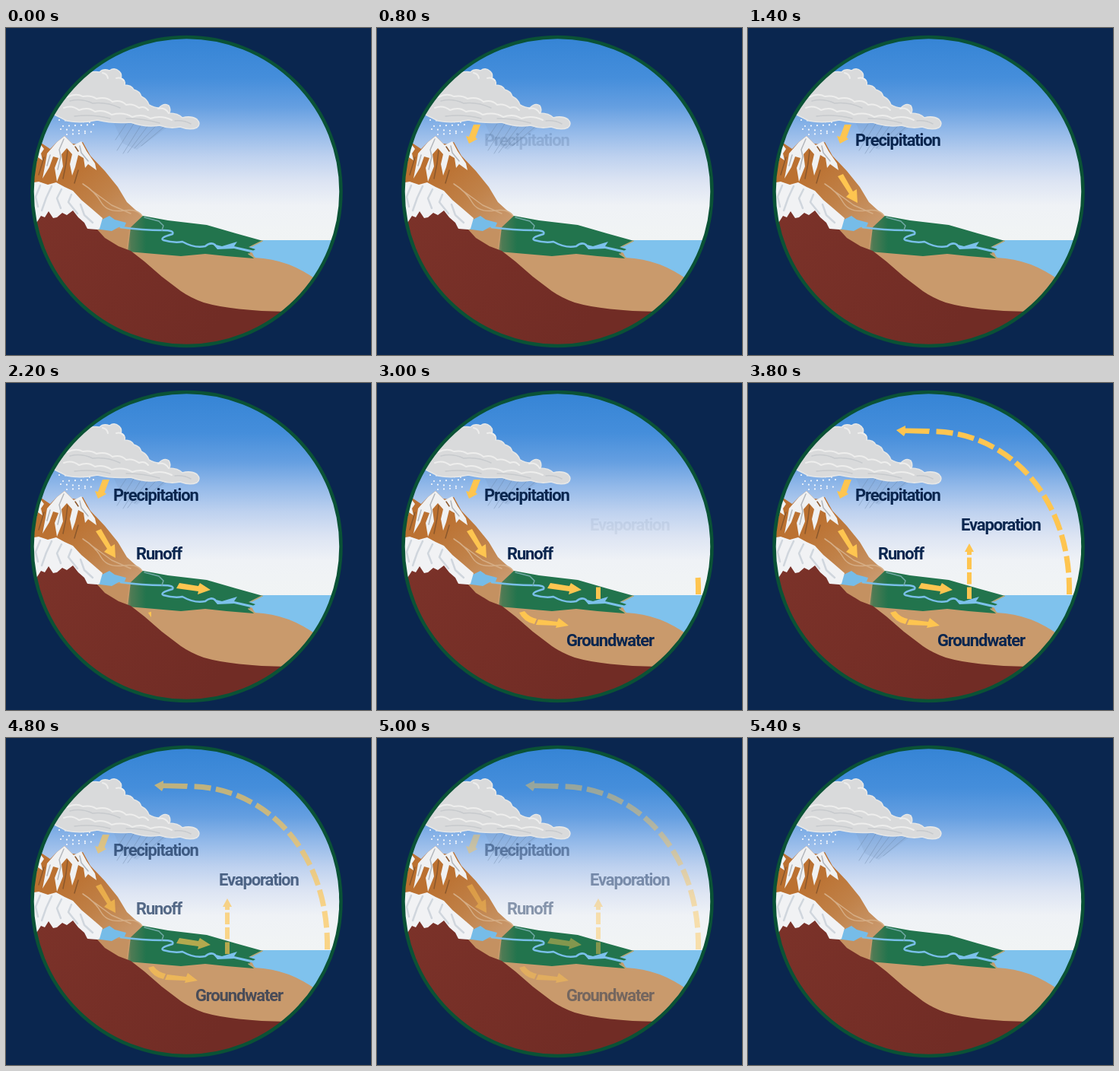
Write an HTML page that moves like this. It is 480 px wide and 430 px high and loops after 5.6 s.

```html
<!DOCTYPE html>
<html lang="en">
<head>
<meta charset="utf-8">
<title>Water cycle</title>
<style>
html, body { margin: 0; width: 100%; height: 100%; overflow: hidden; background: #0a264f; }
svg { display: block; width: 480px; height: 430px; }
text { font: 700 22px Roboto, Lato, sans-serif; letter-spacing: -1.15px; fill: #0a264f; }
.arrow { fill: #fec550; }
.dash { fill: none; stroke: #fec550; }
.line { fill: none; stroke-linecap: round; stroke-linejoin: round; }
</style>
</head>
<body>
<svg viewBox="0 0 480 430">
  <defs>
    <linearGradient id="sky" gradientUnits="userSpaceOnUse" x1="0" y1="12" x2="0" y2="282">
      <stop offset="0" stop-color="#3584d5"/>
      <stop offset=".2" stop-color="#458edb"/>
      <stop offset=".34" stop-color="#659fe1"/>
      <stop offset=".46" stop-color="#93b9e9"/>
      <stop offset=".58" stop-color="#bdd1ef"/>
      <stop offset=".7" stop-color="#dce4f3"/>
      <stop offset=".82" stop-color="#eff2f6"/>
      <stop offset="1" stop-color="#f1f4f4"/>
    </linearGradient>
    <linearGradient id="rock" gradientUnits="userSpaceOnUse" x1="90" y1="180" x2="155" y2="265">
      <stop offset="0" stop-color="#bb7131"/>
      <stop offset=".5" stop-color="#c08148"/>
      <stop offset="1" stop-color="#c9986c"/>
    </linearGradient>
    <linearGradient id="field" gradientUnits="userSpaceOnUse" x1="156" y1="0" x2="184" y2="0">
      <stop offset="0" stop-color="#a48c62"/>
      <stop offset=".3" stop-color="#4f7b54"/>
      <stop offset="1" stop-color="#22744d"/>
    </linearGradient>
    <linearGradient id="soil" gradientUnits="userSpaceOnUse" x1="40" y1="250" x2="270" y2="400">
      <stop offset="0" stop-color="#7b3229"/>
      <stop offset="1" stop-color="#712c25"/>
    </linearGradient>
    <clipPath id="disc"><circle cx="237.5" cy="215" r="203"/></clipPath>
  </defs>

  <g clip-path="url(#disc)">
    <path fill="url(#sky)" d="M30 10H445V282H30Z"/>

    <!-- rain and snow -->
    <path fill="#7895bd" opacity=".2" d="M140 121L214 129L172 160L154 152Z"/>
    <path class="line" stroke="#667f9f" stroke-width="1" opacity=".4"
      d="M158 126L144 147M168 126L146 161M178 127L154 165M187 128L160 164M197 129L169 158M208 130L178 155"/>
    <path class="line" stroke="#f4f7fc" stroke-width="2.2" stroke-dasharray="0 8"
      d="M70 121L112 124M75 129L116 127M72 133L117 137M80 140L108 138"/>

    <!-- cloud -->
    <path fill="#d9dadb" stroke="#e6e7e7" stroke-width="1.5" stroke-linejoin="round"
      d="M60 112L84 80L104 62Q113 56 123 58Q128 53 136 56Q143 51 149 57Q153 61 151 66Q158 69 156 75Q165 75 168 81Q176 83 178 90Q186 94 188 101Q195 105 201 105Q208 98 214 102Q217 107 215 112Q226 112 232 118Q243 115 251 120Q257 126 251 131Q242 135 229 130Q215 133 202 128Q183 131 164 124Q141 126 120 121Q99 126 80 122Z"/>
    <path class="line" stroke="#eeeeed" stroke-width="2"
      d="M80 91Q92 85 101 90Q112 88 119 93Q132 90 140 97Q151 94 158 101Q167 99 175 105Q182 102 187 108M76 105Q87 101 96 108Q108 103 117 110Q128 107 139 114Q155 110 166 117Q179 112 190 119Q204 114 218 121M127 59Q133 60 134 66M145 66Q151 64 155 69M200 106Q209 104 214 112"/>
    <path class="line" stroke="#c7cacd" stroke-width="1.5"
      d="M84 96Q99 92 114 99Q132 97 150 105M90 116Q115 113 137 119M158 119Q181 119 202 125M222 122Q234 121 243 126"/>

    <!-- far mountains -->
    <path fill="url(#rock)"
      d="M30 156L46 151L58 159L67 150L77 142L87 152L94 153L101 150L111 168L130 188L147 209L159 229L180 248L168 268L110 270L30 230Z"/>
    <path fill="#f0f1f2"
      d="M34 160L43 150L50 159L46 165L48 174L42 170L39 180L34 176ZM54 165L67 150L77 142L89 154L99 149L106 162L117 178L119 187L108 179L104 184L102 171L95 167L91 183L87 194L84 179L87 166L80 158L73 166L75 182L67 202L64 184L69 171L62 169L57 183L48 198L52 177Z"/>
    <path class="line" stroke="#b3b7bc" stroke-width="1.5"
      d="M76 146L70 160L72 169L68 186M97 155L99 164L108 175M58 167L54 181M43 155L41 166"/>
    <path class="line" stroke="#8b582c" stroke-width="1.5"
      d="M91 156L95 162M81 161L79 178L75 198M50 170L43 193M95 187L90 204"/>
    <path class="line" stroke="#d5ad85" stroke-width="1.5"
      d="M101 205Q117 215 125 229T155 240T181 252M113 214L139 233L164 244"/>

    <!-- sea, plain and field -->
    <path fill="#7fc2ed" d="M310 279H445V360H310Z"/>
    <path fill="#c99a6c"
      d="M105 255L164 260L330 279L336 281L320 288L327 302Q350 303 372 311Q390 318 410 332V390H100Z"/>
    <path fill="#bd8655" opacity=".45" d="M116 261L162 265L158 294L132 278Z"/>
    <path fill="url(#field)"
      d="M164 262L180 247L213 253L264 259L302 270L338 280L319 288L328 291L320 296L326 303L290 300L262 297L230 300L160 294Z"/>
    <path class="line" stroke="#b7a878" stroke-width="1.5" d="M337 280L323 287M319 297L327 302"/>
    <path fill="#76bce8" d="M118 256L136 247L143 252L158 256L156 261L148 262L139 267L117 264Z"/>
    <path class="line" stroke="#79bfe9" stroke-width="2.5"
      d="M151 262Q180 266 206 266Q222 266 219 271Q201 276 207 279Q221 283 232 281Q248 290 262 287Q269 281 275 285"/>
    <path fill="#7cc1eb" d="M272 284L284 287L304 281L300 287L327 293L326 296L300 290L278 291Z"/>
    <path class="line" stroke="#73aaa7" stroke-width="1.5" d="M182 249L201 254L207 260L205 266"/>

    <!-- near snow ridge -->
    <path fill="#f1f2f4"
      d="M30 204L43 202L55 206L66 203L77 209L88 214L99 226L112 237L127 250L123 264L115 267L98 260L88 250L62 255L50 258L30 268Z"/>
    <path class="line" stroke="#d0d6dd" stroke-width="2.5"
      d="M45 207L39 222L42 235M60 208L53 223L47 240M73 212L67 224L72 237M86 219L82 229L94 244M98 232L103 246L114 256"/>
    <path fill="url(#soil)"
      d="M30 268L39 258L46 247L51 249L56 241L62 250L67 249L74 243L80 246L88 240L95 249L103 256L107 264L120 265L130 276L148 287L164 293L182 307L205 327L230 346Q243 355 260 361Q298 372 370 373L360 425H30Z"/>
  </g>
  <circle cx="237.5" cy="215" r="203" fill="none" stroke="#0a5236" stroke-width="4.500"/>

  <g id="labels">
    <path id="fall" class="arrow" d="M127 127H136L129.500 144L132 146L121 152L117 142L121 143Z"/>
    <path id="slope" class="arrow" d="M118 195L125 192L138 215L143 212L144 230L129 222L133 218Z"/>
    <path id="stream" class="arrow" d="M228 263L253 267L255 263L269 272L252 278L253 274L224 270Z"/>
    <g id="under">
      <path class="arrow" d="M187 302L194 300Q200 308 210 310L207 317Q193 314 187 302Z"/>
      <path class="arrow" d="M212 311L237 314L239 309L252 319L235 322L236 319L209 318Z"/>
    </g>
    <path id="rise" class="dash" stroke-width="6" d="M291 284V213"/>
    <path id="riseHead" class="arrow" d="M291 211L297 222H294V226H288V222H285Z"/>
    <path id="arc" class="dash" stroke-width="7" pathLength="11" d="M422.500 278C425 150 342 64 241 63.500"/>
    <path id="arcHead" class="arrow" d="M195 62L207 56V59.500L239 60L238 67L207 66L205 70Z"/>
    <text id="precipitation" x="141" y="155">Precipitation</text>
    <text id="runoff" x="171" y="232">Runoff</text>
    <text id="groundwater" x="249" y="346">Groundwater</text>
    <text id="evaporation" x="280" y="193.500">Evaporation</text>
  </g>
</svg>
<script>
const LOOP = 5600, STEP = 200;
const el = id => document.getElementById(id);
const ramp = (t, start, length) => Math.min(1, Math.max(0, (t - start) / length));
const fade = (id, p) => el(id).style.opacity = p;
const show = (id, on) => el(id).style.visibility = on ? "visible" : "hidden";

function wipe(id, p, down) {
  const cut = (1 - p) * 100 + "%";
  el(id).style.clipPath = down ? `inset(0 0 ${cut} 0)` : `inset(0 ${cut} 0 0)`;
  show(id, p > 0);
}

// Reveals the first few dashes of a line.
function dashes(id, count, on, off) {
  show(id, count > 0);
  el(id).setAttribute("stroke-dasharray", `${on} ${off} `.repeat(count) + "0 999");
}

function draw(now) {
  const t = Math.floor(now % LOOP / STEP) * STEP;

  wipe("fall", ramp(t, 200, 600), true);
  fade("precipitation", ramp(t, 700, 700));
  show("slope", t >= 1400);
  fade("runoff", ramp(t, 1500, 700));
  wipe("stream", ramp(t, 1600, 600));
  wipe("under", ramp(t, 2170, 500));
  fade("groundwater", ramp(t, 2300, 700));

  const beat = Math.max(0, (t - 2800) / STEP);
  dashes("rise", Math.min(3, beat), 15.5, 4);
  dashes("arc", beat && Math.min(11, beat * 5 - 4), .77, .23);
  show("riseHead", beat >= 4);
  show("arcHead", beat >= 4);
  fade("evaporation", ramp(t, 2950, 850));

  fade("labels", 1 - ramp(t, 4500, 900));
  requestAnimationFrame(() => draw(performance.now()));
}
draw(0);
</script>
</body>
</html>
```
